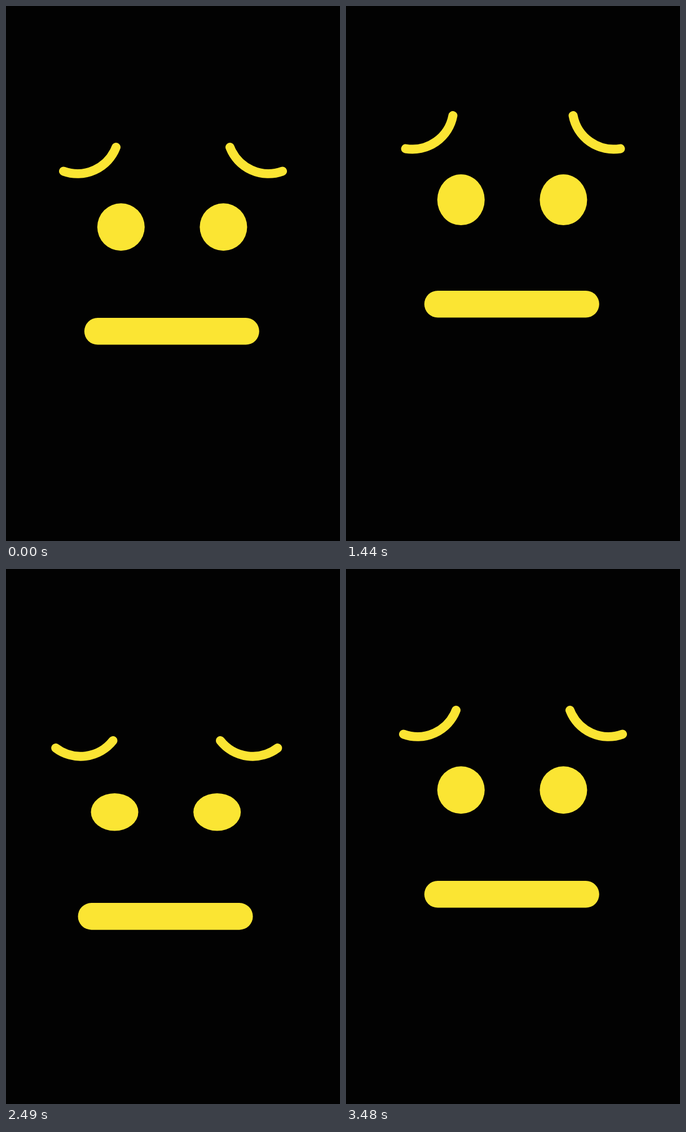
Recreate the animation shown at these times as an HTML page. Size 592 by 947 pixels, loop 3750 ms.

```html
<!DOCTYPE html>
<html lang="en">
<head>
<meta charset="utf-8">
<title>Sad face</title>
<style>
  html, body { margin: 0; width: 100%; height: 100%; overflow: hidden; background: #020202; }
  svg { display: block; width: 100vw; height: 100vh; fill: #fbe533; }
  .brow { fill: none; stroke: #fbe533; stroke-width: 16; stroke-linecap: round; }
</style>
</head>
<body>
<svg viewBox="0 0 592 947">
  <g id="face">
    <path class="brow" d="M102 292.4A73 73 0 0 0 195 250"/>
    <g transform="translate(592 0) scale(-1 1)">
      <path class="brow" d="M102 292.4A73 73 0 0 0 195 250"/>
    </g>
    <ellipse id="eyeL" cx="203.8" cy="391.2" rx="42" ry="42"/>
    <ellipse id="eyeR" cx="385.4" cy="391.2" rx="42" ry="42"/>
    <rect x="138.8" y="552" width="310" height="47.6" rx="23.8"/>
  </g>
</svg>
<script>
const LOOP = 3750, STEP = 30;

const sine = p => (1 - Math.cos(Math.PI * p)) / 2;
const linear = p => p;

// Bezier ease with control points (x1, 0) and (x2, 1)
const bezier = (x1, x2) => p => {
  let lo = 0, hi = 1;
  for (let i = 0; i < 24; i++) {
    const s = (lo + hi) / 2, r = 1 - s;
    const x = 3 * r * r * s * x1 + 3 * r * s * s * x2 + s * s * s;
    if (x < p) lo = s; else hi = s;
  }
  return lo * lo * (3 - 2 * lo);
};
const rise = bezier(0.69, 0.55);
const settle = bezier(0.33, 0.67);

// Progress from 0 to 1 between two times
const ramp = (t, from, to, ease = sine) =>
  ease(Math.min(1, Math.max(0, (t - from) / (to - from))));

// Head shake: turning points as time and offset
const swings = [[1630, 0], [1770, -19], [1950, 16], [2140, -20], [2360, 20], [2560, -23], [2730, 2]];
const shake = t => swings.slice(1).reduce((x, [to, end], i) => {
  const [from, begin] = swings[i];
  return x + (end - begin) * ramp(t, from, to);
}, 0);

const byId = id => document.getElementById(id);
const brows = document.querySelectorAll('.brow');

function draw(t) {
  const lift = ramp(t, 590, 1440, rise);
  const drop = ramp(t, 1455, 1815);
  const sink = ramp(t, 1815, 2730, linear);
  const stay = 1 - ramp(t, 2940, 3480, settle);

  const x = shake(t) * stay;
  const y = (-48.1 * lift + 54.8 * drop + 43.9 * sink) * stay;
  const tilt = (-10.4 * ramp(t, 590, 1080) + 27.6 * ramp(t, 1455, 1860)) * stay;
  const eye = end => 42 + (3 * lift - 11.8 * ramp(t, 1470, end)) * stay;

  byId('face').setAttribute('transform', `translate(${x} ${y})`);
  brows.forEach(b => b.setAttribute('transform', `rotate(${tilt} 149 276.5)`));
  byId('eyeL').setAttribute('ry', eye(2040));
  byId('eyeR').setAttribute('ry', eye(1980));
}

const start = performance.now();
function tick() {
  const t = (performance.now() - start) % LOOP;
  draw(Math.floor(t / STEP) * STEP);
  requestAnimationFrame(tick);
}
draw(0);
requestAnimationFrame(tick);
</script>
</body>
</html>
```
